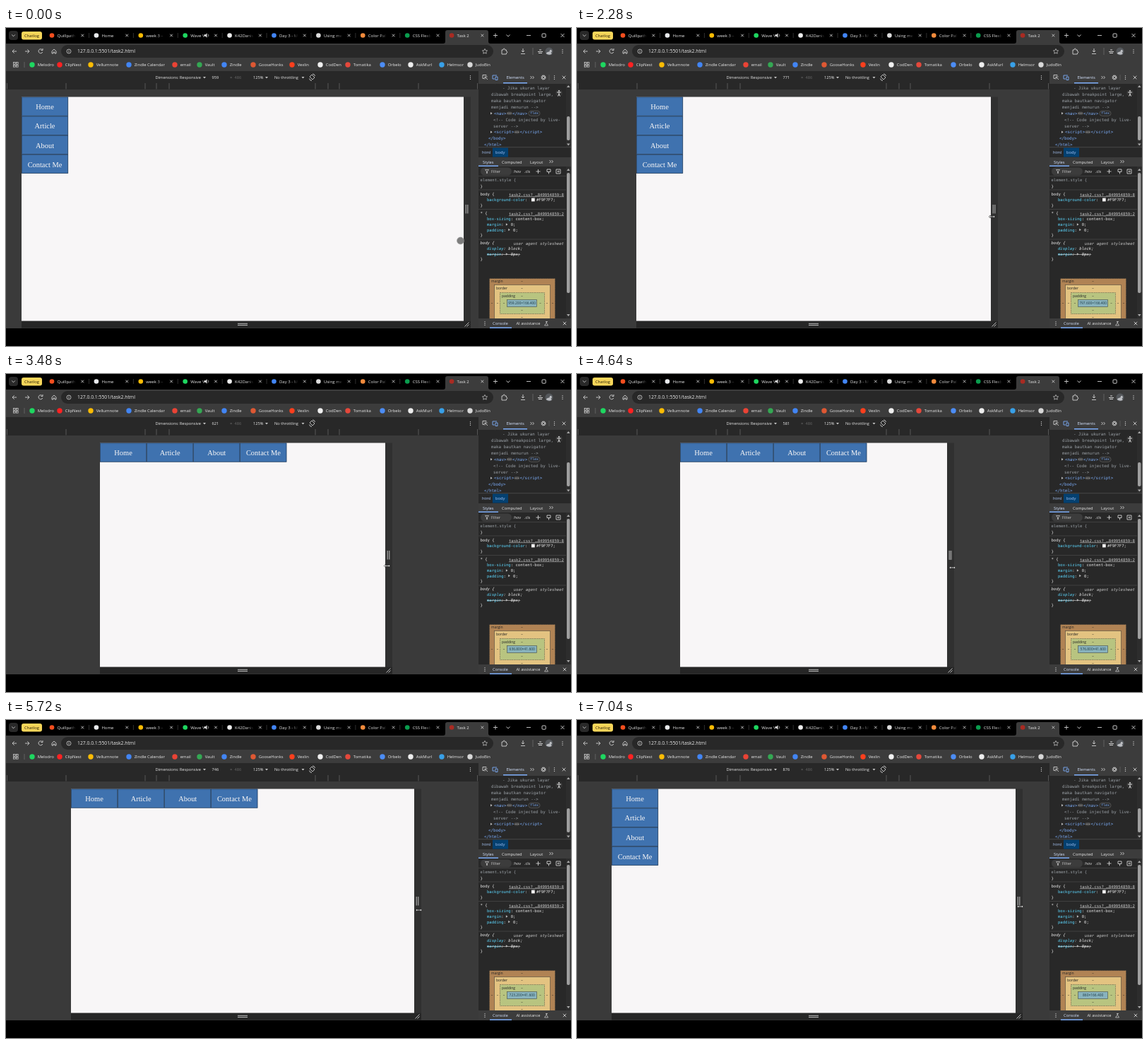
Animation, 800 px wide and 450 px high, one loop 7080 ms. Source, as an HTML page:

```html
<!DOCTYPE html>
<html lang="en">
<head>
<meta charset="utf-8">
<title>Responsive navigation</title>
<style>
  html, body { margin: 0; width: 100%; height: 100%; overflow: hidden; background: #000; }
  svg { display: block; width: 800px; height: 450px; }
  text { font-family: "Open Sans", "Noto Sans", sans-serif; font-weight: 500; white-space: pre; }
  .mono { font-family: "DejaVu Sans Mono", "Noto Sans Mono", monospace; font-weight: 400; }
  .serif { font-family: "Liberation Serif", "Noto Serif", serif; font-weight: 400; }
</style>
</head>
<body>
<svg id="stage" viewBox="0 0 800 450"></svg>
<script>
const LOOP = 7080, STEP = 40, SCALE = 0.652, CENTER = 335, TOP = 97.5;
const ITEM_W = 66.1, ITEM_H = 27.1, BREAKPOINT = 768, LAG = 140;
const LIGHT = '#e8e8e8', GREY = '#9aa0a6', BLUE = '#7cacf8', CYAN = '#5cd5fb';
const PANEL = '#282828', BAR = '#3c3c3c';

const rect = (x, y, w, h, fill, extra = '') =>
  `<rect x="${x}" y="${y}" width="${w}" height="${h}" fill="${fill}" ${extra}/>`;
const dot = (x, y, r, fill, extra = '') => `<circle cx="${x}" cy="${y}" r="${r}" fill="${fill}" ${extra}/>`;
const line = (d, color = '#d0d0d0', width = 0.9, extra = '') =>
  `<path d="${d}" fill="none" stroke="${color}" stroke-width="${width}" ${extra}/>`;
const text = (x, y, s, size = 5.8, fill = LIGHT, extra = '') =>
  `<text x="${x}" y="${y + size * 0.36}" font-size="${size}" fill="${fill}" ${extra}>${s}</text>`;
const esc = s => s.replace(/</g, '&lt;').replace(/>/g, '&gt;');
const code = (x, y, s, size = 5.6, fill = LIGHT, extra = '') =>
  text(x, y, s, size, fill, `class="mono" ${extra}`);
const span = (s, fill) => `<tspan fill="${fill}">${s}</tspan>`;
const cross = (x, y, r = 2, color) => line(`M${x - r} ${y - r}l${2 * r} ${2 * r}m0 ${-2 * r}l${-2 * r} ${2 * r}`, color);
const down = (x, y, color = '#c7c7c7') => `<path d="M${x - 2} ${y - 1}h4l-2 2.6z" fill="${color}"/>`;
const right = (x, y) => `<path d="M${x} ${y - 1.8}v3.6l2.6-1.8z" fill="#bdbdbd"/>`;
const kebab = (x, y) => [-2.4, 0, 2.4].map(d => dot(x, y + d, 0.65, '#d0d0d0')).join('');
const more = (x, y) => line(`M${x - 2.5} ${y - 2}l2 2-2 2m3-4l2 2-2 2`);

function tabStrip() {
  const tabs = [
    ['Quillpath', '#f24e1e'], ['Home', '#e8eaed'], ['week 3 –', '#fbbc04'], ['Wave V', '#1ed760'],
    ['K42Danis', '#f0f0f0'], ['Day 3 - M', '#4285f4'], ['Using me', '#dddddd'],
    ['Color Pal', '#f28b3c'], ['CSS Flexb', '#0a9d4e'], ['Task 2', '#a92b22']
  ];
  let s = rect(0, 0, 800, 22, '#000') + rect(4, 4, 13, 13, '#292929', 'rx="4"') + line('M8.2 9.5l2.3 2.3 2.3-2.3') +
    rect(22, 5, 29, 11.5, '#f7d65a', 'rx="3"') +
    text(36.5, 10.6, 'Chatlog', 5.9, '#201a00', 'text-anchor="middle"') +
    `<path d="M619 22q3 0 3-3V6q0-3 3-3h55q3 0 3 3v13q0 3 3 3z" fill="${BAR}"/>`;
  tabs.forEach(([label, color], i) => {
    const x = 65 + i * 62.9, active = i === tabs.length - 1;
    s += dot(x, 10.5, 3.3, color) + text(x + 7.5, 10.6, label, 6);
    if (!active) {
      s += rect(x + 24, 4, 10, 14, 'url(#fade)');
      if (i < 8) s += line(`M${x + 52.5} 7v7`, '#444', 0.7);
    }
    s += cross(x + 43.3, 10.5, 1.8);
  });
  return s + '<path d="M280.5 9.3h2l2-2v6.4l-2-2h-2z" fill="#ddd"/>' + line('M286 8.7q1.5 1.8 0 3.6', '#ddd', 0.7) +
    line('M690 10.5h6m-3-3v6M708.5 9.5l2.5 2.5 2.5-2.5M737 10.5h6') +
    rect(759, 8, 5.2, 5.2, 'none', 'stroke="#ddd" stroke-width=".9" rx="1"') + cross(788, 10.5, 2.5);
}

function addressBar() {
  return rect(0, 22, 800, 39, BAR) + rect(78, 24, 612, 18, PANEL, 'rx="9"') +
    line('M15 33H9l2.7-2.7M9 33l2.7 2.7M27 33h6l-2.7-2.7M33 33l-2.7 2.7') +
    line('M51.5 31a3 3 0 1 0 .3 3M52 29v2.6h-2.6M65 32.8l3-2.8 3 2.8v3.2h-2v-2h-2v2h-2z') +
    dot(89, 33, 3, 'none', 'stroke="#d0d0d0" stroke-width=".8"') + line('M89 32.4v2.2M89 31v.7') +
    text(101, 33, '127.0.0.1:5501/task2.html', 6.8) +
    line('M678 29.4l1.1 2.3 2.5.3-1.8 1.7.4 2.5-2.2-1.2-2.2 1.2.4-2.5-1.8-1.7 2.5-.3z', '#d0d0d0', 0.7) +
    line('M702 31h2q0-2 1.2-2t1.2 2h2v2q1.4 0 1.4 1.2t-1.4 1.2v1.6H702zM732 29v5m-2-2l2 2 2-2m-5 4.5h6') +
    line('M746 28v10', '#666') + dot(769, 33, 5.5, '#55585c') +
    '<path d="M764.5 36q2-3 5-2.5 0-3.5 2.5-2.5 2 2-.5 4 1.5 1 1 2-4 2-8-1z" fill="#bcbec2"/>' + kebab(788, 33) +
    line('M753 33.5h7m-6 2h5M755 31h3', '#d0d0d0', 1);
}

function bookmarks() {
  const marks = [
    [37, 'Melodro', '#1ed760'], [76, 'ClipNest', '#f22'], [120, 'Vellumnote', '#fbbc04'],
    [174, 'Zindle Calendar', '#4285f4'], [239, 'email', '#ea4335'], [274, 'Vault', '#34a853'],
    [309, 'Zindle', '#4285f4'], [350, 'GooseHonks', '#de5833'], [405, 'Vexlin', '#fc3f1d'],
    [445, 'CodDen', '#f0f0f0'], [484, 'Tomatika', '#e5483b'], [533, 'Orbelo', '#4c8df6'],
    [573, 'AskMurl', '#eeeeee'], [617, 'Helmsor', '#38a0e8'], [657, 'JudoBin', '#d8d8d8']
  ];
  const apps = [0, 1, 2, 3].map(i =>
    rect(10.5 + i % 2 * 4, 48.5 + (i >> 1) * 4, 2.6, 2.6, 'none', 'stroke="#ccc" stroke-width=".8"')).join('');
  return apps + line('M26 48v8', '#666') +
    marks.map(([x, label, color]) => dot(x, 52, 3.7, color) + text(x + 7.7, 52, label, 5.9)).join('');
}

function deviceBar() {
  const ticks = [250, 138, 122, 104].flatMap(d => [CENTER - d, CENTER + d - 1]).concat(1.5, 667.5);
  return rect(0, 61, 669, 26, PANEL) + text(211.5, 70, 'Dimensions: Responsive', 5.7) + down(281, 70) +
    text(317, 70, '×', 5.7, '#777') + text(323.5, 70, '486', 5.7, '#666') +
    text(350, 70, '125%', 5.7) + down(369, 70) + text(380, 70, 'No throttling', 5.7) + down(420.5, 70) +
    line('M430 69l3-3 4 4-3 3zM429.5 71.5q.5 3 3.5 3M437.5 68q-.5-3-3.5-3') + kebab(657.5, 70) +
    rect(0, 87, 669, 338, '#3a3a3a') +
    ticks.map(x => line(`M${x} 78v8.5`, '#626262', 0.8)).join('');
}

function elementsPanel() {
  const rows = [
    [687, 'menurun'], [703, '- Jika ukuran layar'], [687, 'dibawah breakpoint large,'],
    [687, 'maka bautkan navigator'], [687, 'menjadi menurun -->'], [691, '<nav>', '</nav>'],
    [690, '<!-- Code injected by live-'], [690, 'server -->'], [691, '<script>', '<\/script>'],
    [683, '</body>'], [677, '</html>']
  ];
  let s = rect(669, 61, 131, 364, PANEL);
  rows.forEach(([x, label, close], i) => {
    const y = 76.5 + i * 8.85, tag = /^<\/?\w/.test(label);
    s += code(x, y, esc(label), 5.85, tag ? BLUE : GREY);
    if (close) {
      const gap = x + label.length * 3.51;
      s += right(686, y) + rect(gap + 0.5, y - 2.3, 7.5, 4.6, '#4a4a4a', 'rx="2"') +
        [2, 4.2, 6.4].map(d => dot(gap + d, y, 0.5, '#ccc')).join('') + code(gap + 8.5, y, esc(close), 5.85, BLUE);
    }
  });
  s += rect(740, 117.3, 16, 7, 'none', 'rx="3.5" stroke="#666" stroke-width=".7"') +
    code(748, 120.6, 'flex', 5, BLUE, 'text-anchor="middle"');
  s += rect(669, 61, 131, 18, BAR) + line('M680 67.5v-1h-5v5h2M678 69l4 4m-4-4v3.5m0-3.5h3.5') +
    line('M689 67h6m-6 0v5h3m1-3h3v4.5h-3z', BLUE) + text(708.5, 70, 'Elements', 5.9, '#d6e4ff') +
    rect(704, 77, 34, 1.5, BLUE) + more(745, 70) +
    dot(761, 70, 2.7, 'none', 'stroke="#d0d0d0" stroke-width="1.5" stroke-dasharray="1.4 .7"') +
    dot(761, 70, 1.6, 'none', 'stroke="#d0d0d0" stroke-width=".8"') + line('M769 66v8', '#5a5a5a') +
    kebab(776.5, 70) + cross(790, 70, 2.3);
  s += dot(783, 92, 5, '#333') + dot(783, 89, 0.9, '#eee') + line('M780 91h6m-3 0v2.5l-1.5 3m1.5-3l1.5 3', '#eee');
  s += rect(669, 169, 131, 14, PANEL) + rect(689, 169.5, 22, 13, '#044070') +
    text(674, 175.8, 'html', 5.8, '#a8c7fa') + text(693, 175.8, 'body', 5.8, '#a8c7fa') +
    line('M669 168.7h131', '#555', 0.7);
  return s + rect(793, 79, 7, 89, '#2d2d2d') + rect(794, 125, 4.5, 34, '#9f9f9f', 'rx="2"') +
    '<path d="M794 84l2.3-3 2.3 3zM794 163.5l2.3 3 2.3-3z" fill="#aaa"/>';
}

function stylesPanel() {
  const rules = [
    [215, 'element.style {', GREY], [224, '}'], [234.5, 'body {'], [251, '}'],
    [262, '* {'], [293, '}'], [304, 'body {', LIGHT, 'font-style="italic"'], [327, '}']
  ];
  const props = [
    [243, 'background-color', ''], [270, 'box-sizing', 'content-box;'], [278, 'margin', '0;', 1],
    [285.5, 'padding', '0;', 1], [312, 'display', 'block;', 0, 'font-style="italic"'],
    [320, 'margin', '8px;', 1, 'font-style="italic" text-decoration="line-through"']
  ];
  const link = (y, s, extra) => code(790, y, s, 5.65, '#c7c7c7', `text-anchor="end" ${extra}`);
  let s = rect(669, 183, 131, 13, BAR) + text(675, 189.5, 'Styles', 5.8, '#d6e4ff') +
    rect(669, 194.5, 28, 1.5, BLUE) + text(702, 189.5, 'Computed') + text(742, 189.5, 'Layout') + more(772, 189) +
    rect(672, 197.5, 44, 11, BAR, 'rx="5.5"') + line('M678.5 200.5h5l-2 2.5v2.5h-1V203z', '#d0d0d0', 0.7) +
    text(687, 203, 'Filter', 5.6, '#c7c7c7') + text(718, 203, ':hov', 5.6) + text(734, 203, '.cls', 5.6) +
    line('M750.5 203h6m-3-3v6M766 200h5v3.5h-5zm2.5 3.5v3') +
    line('M779 200h6v6h-6zM784 203h-3l1.3-1.3M781 203l1.3 1.3') +
    line('M669 209.5h131M669 229h124M669 256.5h124M669 299h124', '#4a4a4a', 0.7);
  s += rules.map(([y, label, fill = LIGHT, extra = '']) => code(671.5, y, label, 5.6, fill, extra)).join('');
  s += props.map(([y, name, value, arrow, extra = '']) =>
    code(681, y, span(name, CYAN) + (arrow ? ':   ' : ': ') + value, 5.6, LIGHT, extra) +
    (arrow ? right(681 + (name.length + 2) * 3.36, y) : '')).join('');
  s += rect(744, 240.7, 4.7, 4.7, '#f9f7f7') + code(751, 243, '#F9F7F7;') +
    link(235.5, 'task2.css?_…849954859:8', 'text-decoration="underline"') +
    link(262.5, 'task2.css?_…849954859:2', 'text-decoration="underline"') +
    link(304.5, 'user agent stylesheet', 'font-style="italic"');
  return s + rect(793, 196, 7, 215, '#2d2d2d') + rect(794, 205, 4.5, 170, '#9f9f9f', 'rx="2"') +
    '<path d="M794 202l2.3-3 2.3 3zM794 405l2.3 3 2.3-3z" fill="#aaa"/>';
}

function boxModel() {
  const mark = (x, y) => text(x, y, '–', 5, '#222', 'text-anchor="middle"');
  const box = (x, y, w, h, fill, dash) =>
    rect(x, y, w, h, fill, `stroke="#333" stroke-opacity=".7" stroke-width=".7" ${dash ? 'stroke-dasharray="1.5 1"' : ''}`);
  return '<g clip-path="url(#boxClip)">' +
    box(684.5, 354.5, 93, 70, '#b08354', 1) + box(691.5, 363.5, 79, 51, '#e3c381') +
    box(699.5, 374.5, 63, 30, '#b8c480', 1) + box(709.5, 384.5, 42, 10, '#88b2bd') +
    text(687, 358.5, 'margin', 5, '#222') + text(694, 368.5, 'border', 5, '#222') + text(702, 379, 'padding', 5, '#222') +
    [358.5, 368.5, 379, 399, 409].map(y => mark(730.5, y)).join('') +
    [688, 696, 705, 756.5, 766, 774].map(x => mark(x, 389)).join('') + '</g>' +
    rect(669, 411, 131, 14, BAR) + kebab(678, 418) + text(689, 418, 'Console', 5.8, '#d6e4ff') +
    rect(685, 423.5, 31, 1.5, BLUE) + text(722.5, 418, 'AI assistance', 5.7) +
    line('M764 415.5h3m-2 0v2l-2.5 3.5h5l-2-3.5v-2', '#d0d0d0', 0.7) + cross(791, 418, 2.2);
}

function page() {
  const items = ['Home', 'Article', 'About', 'Contact Me'].map(label =>
    '<g class="item">' + rect(0.35, 0.35, ITEM_W - 0.7, ITEM_H - 0.7, '#3f72af', 'stroke="#112d4e" stroke-width=".7"') +
    text(ITEM_W / 2, 14.1, label, 10.42, '#f9f7f7', 'class="serif" text-anchor="middle"') + '</g>').join('');
  return rect(0, TOP, 10, 317, '#303030', 'id="sideBar"') + rect(0, 414.5, 10, 10, '#262626', 'id="footBar"') +
    rect(0, TOP, 10, 317, '#f8f6f7', 'id="sheet"') + items + line('M328 418.3h14m-14 2.3h14', '#d5d5d5', 0.9) +
    '<g id="grip">' + line('M-1.3 250v12.5M1.3 250v12.5', '#cfcfcf', 0.9) +
    rect(-2, 250, 4, 13, '#777', 'id="gripFill"') +
    line('M-3 422.5l6-6M0 422.5l3-3', '#cfcfcf', 0.9) + '</g>';
}

const arrow = 'M-4.3 0l2-2v1.3h4.6V-2l2 2-2 2V.7h-4.6V2z';
const stage = document.getElementById('stage');
stage.innerHTML = `<defs>
  <linearGradient id="fade"><stop offset="0" stop-color="#000" stop-opacity="0"/><stop offset="1" stop-color="#000"/></linearGradient>
  <clipPath id="boxClip"><rect x="669" y="340" width="124" height="71"/></clipPath></defs>` +
  rect(0, 0, 800, 450, '#000') + deviceBar() + page() + elementsPanel() + stylesPanel() + boxModel() +
  tabStrip() + addressBar() + bookmarks() +
  text(291.5, 70, '', 5.7, LIGHT, 'id="widthLabel"') +
  text(730.7, 389, '', 4.9, '#1d3a44', 'id="boxLabel" text-anchor="middle"') +
  dot(0, 0, 5, '#777', 'id="touch" stroke="#999" stroke-width=".6" opacity=".95"') +
  `<path id="arrow" d="${arrow}" fill="#fff" stroke="#111" stroke-width=".6"/>`;

const $ = id => document.getElementById(id);
const items = [...document.querySelectorAll('.item')];
const set = (id, attrs) => { for (const k in attrs) $(id).setAttribute(k, attrs[k]); };

// Monotone cubic through [time, value] keys, flat at both ends and at turning points.
function track(keys, t) {
  const n = keys.length - 1;
  if (t <= keys[0][0]) return keys[0][1];
  if (t >= keys[n][0]) return keys[n][1];
  const slope = i => (keys[i + 1][1] - keys[i][1]) / (keys[i + 1][0] - keys[i][0]);
  const tangent = i => {
    if (i === 0 || i === n) return 0;
    const a = slope(i - 1), b = slope(i);
    return a * b > 0 ? 2 * a * b / (a + b) : 0;
  };
  const i = keys.findIndex(k => k[0] > t) - 1;
  const [t0, a] = keys[i], [t1, b] = keys[i + 1], h = t1 - t0, u = (t - t0) / h, v = 1 - u;
  return a * v * v * (1 + 2 * u) + b * u * u * (3 - 2 * u) + h * u * v * (tangent(i) * v - tangent(i + 1) * u);
}

// The drag is still moving when the loop restarts, so its last key lies past the end.
const WIDTH = [[0, 959], [850, 959], [1440, 899], [2160, 794], [2280, 771], [2880, 702], [3480, 621],
  [4150, 572], [4640, 581], [5040, 617], [5720, 746], [7040, 876], [7240, 910]];
const POINTER_DX = [[0, -9], [200, -9], [760, 0], [1440, -1], [2280, -3], [3480, -2], [4640, 3], [5720, 2], [7040, 2]];
const POINTER_Y = [[0, 301], [200, 301], [760, 262], [1440, 264], [2280, 267], [3480, 271.5], [4640, 274], [5720, 269], [7040, 264]];

function draw(t) {
  const width = track(WIDTH, t), half = width * SCALE / 2;
  const left = Math.round(CENTER - half), edge = Math.round(CENTER + half), w = edge - left;
  const row = width < BREAKPOINT;
  set('sheet', { x: left, width: w });
  set('sideBar', { x: edge });
  set('footBar', { x: left, width: w + 10 });
  set('grip', { transform: `translate(${edge + 4.5} 0)` });
  set('gripFill', { opacity: t > 4200 && t < 4800 ? 1 : 0 });
  items.forEach((el, i) => el.setAttribute('transform',
    `translate(${left + (row ? i * ITEM_W : 0)} ${TOP + (row ? 0 : i * ITEM_H)})`));
  $('widthLabel').textContent = Math.round(width);

  // The box model readout trails the drag and snaps to device pixels.
  const late = track(WIDTH, t - LAG), snapped = Math.round(late / 0.8) * 0.8;
  const shown = Math.abs(snapped - Math.round(snapped)) < 0.01 ? snapped.toFixed(0) : snapped.toFixed(3);
  $('boxLabel').textContent = shown + '×' + (late < BREAKPOINT ? '41.600' : '166.400');

  const x = edge + 4.5 + track(POINTER_DX, t), y = track(POINTER_Y, t), onPage = x < edge;
  set('touch', { cx: x, cy: y, visibility: onPage ? 'visible' : 'hidden' });
  set('arrow', { transform: `translate(${x} ${y})`, visibility: onPage ? 'hidden' : 'visible' });
}

const start = performance.now();
function tick() {
  const t = (performance.now() - start) % LOOP;
  draw(Math.floor(t / STEP) * STEP);
  requestAnimationFrame(tick);
}
tick();
</script>
</body>
</html>
```
